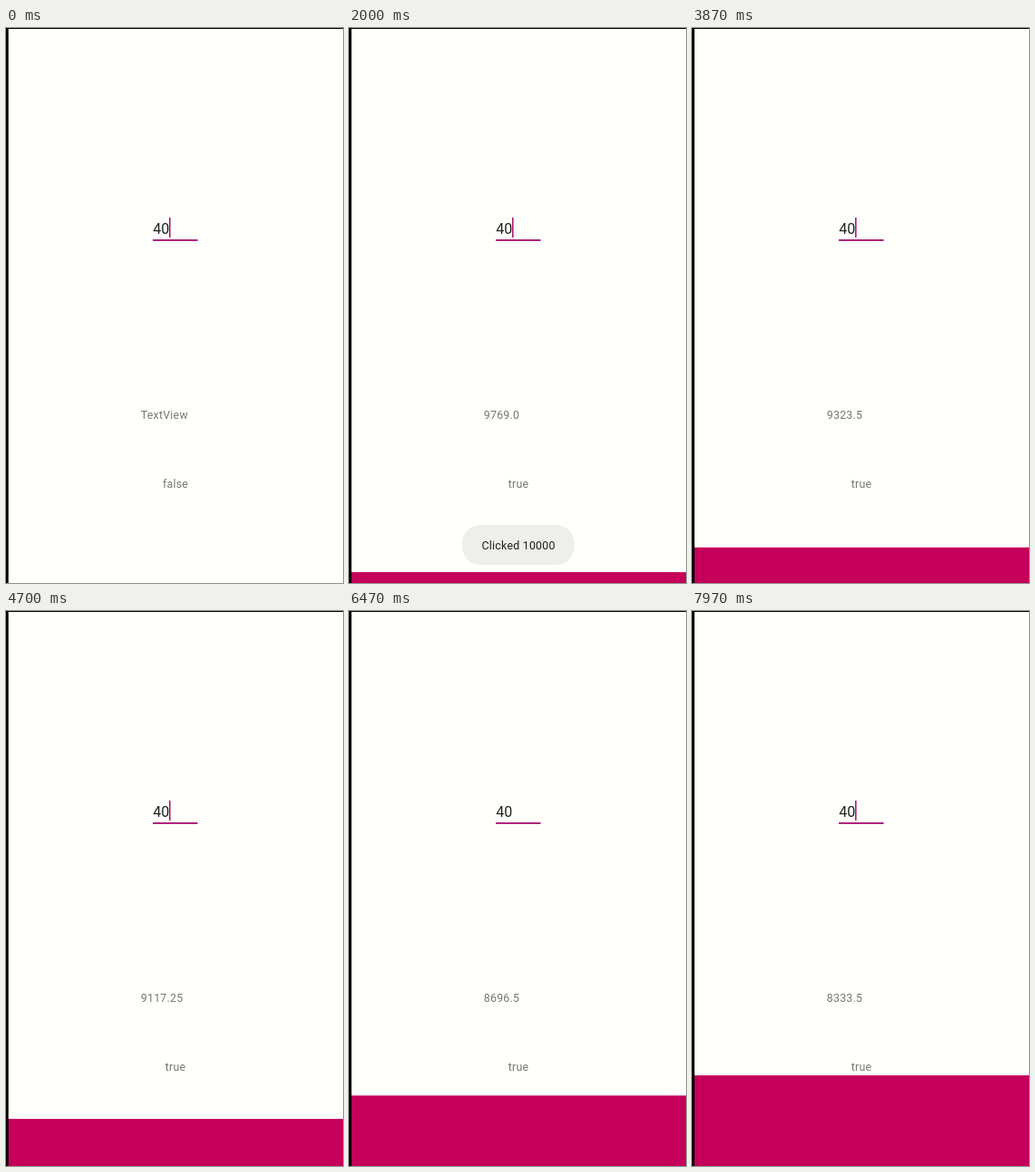
Animation of 372 by 612 pixels, one loop 8000 ms. Source, as an HTML page with a canvas:

```html
<!DOCTYPE html>
<html lang="en">
<head>
<meta charset="utf-8">
<title>Countdown</title>
<style>
  html, body { margin: 0; width: 100%; height: 100%; overflow: hidden; background: #fffffb; }
  canvas { display: block; }
</style>
</head>
<body>
<canvas id="stage" width="372" height="612"></canvas>
<script>
const W = 372, H = 612, LOOP = 8000;
const CLICK = 1000, START = 1030, TICK = 34.3;
const TOTAL = 10000, STEP = 8.25;
const ctx = document.getElementById('stage').getContext('2d');

const clamp = x => Math.min(1, Math.max(0, x));
const ramp = (t, from, to) => clamp((t - from) / (to - from));

function rect(x, y, w, h, color) {
  ctx.fillStyle = color;
  ctx.fillRect(x, y, w, h);
}

function text(str, x, y, { size = 12.4, color = '#767674', align = 'left', spacing = 0.22 } = {}) {
  ctx.font = `${size}px Roboto, sans-serif`;
  ctx.letterSpacing = `${spacing}px`;
  ctx.textAlign = align;
  ctx.fillStyle = color;
  ctx.fillText(str, x, y);
}

function drawInput(t) {
  text('40', 162.3, 226.7, { size: 16, color: '#20201f', spacing: 0 });
  rect(162, 233, 49.6, 2, '#ae267c');
  const blink = (t - 670 + 1000) % 1000;
  if (blink < 515) rect(180, 209, 1.6, 22, '#ae1a72');
}

function drawToast(t) {
  const alpha = ramp(t, 1030, 1200) * (1 - ramp(t, 3500, 3700));
  if (!alpha) return;
  ctx.globalAlpha = alpha;
  ctx.fillStyle = '#eeefeb';
  ctx.beginPath();
  ctx.roundRect(125, 548, 123.6, 44, 20);
  ctx.fill();
  text('Clicked 10000', 187.1, 575, { color: '#1e1e1d', align: 'center' });
  ctx.globalAlpha = 1;
}

function draw(t) {
  rect(0, 0, W, H, '#fffffb');

  const clicked = t >= CLICK;
  const spent = Math.max(0, Math.floor((t - START) / TICK)) * STEP;
  const left = TOTAL - spent;
  const label = Number.isInteger(left) ? left.toFixed(1) : String(left);

  if (clicked) {
    const top = 614.2 - spent * 0.0613;
    rect(0, top, W, Math.max(0, H - top), '#c5005b');
  }
  drawInput(t);
  text(clicked ? label : 'TextView', 148.8, 431.4);
  text(String(clicked), 187.1, 506.9, { align: 'center' });
  drawToast(t);

  rect(0, 0, 2.7, H, '#000');
  rect(0, 0, W, 1, '#000');
}

function loop() {
  draw(performance.now() % LOOP);
  requestAnimationFrame(loop);
}
loop();
</script>
</body>
</html>
```
